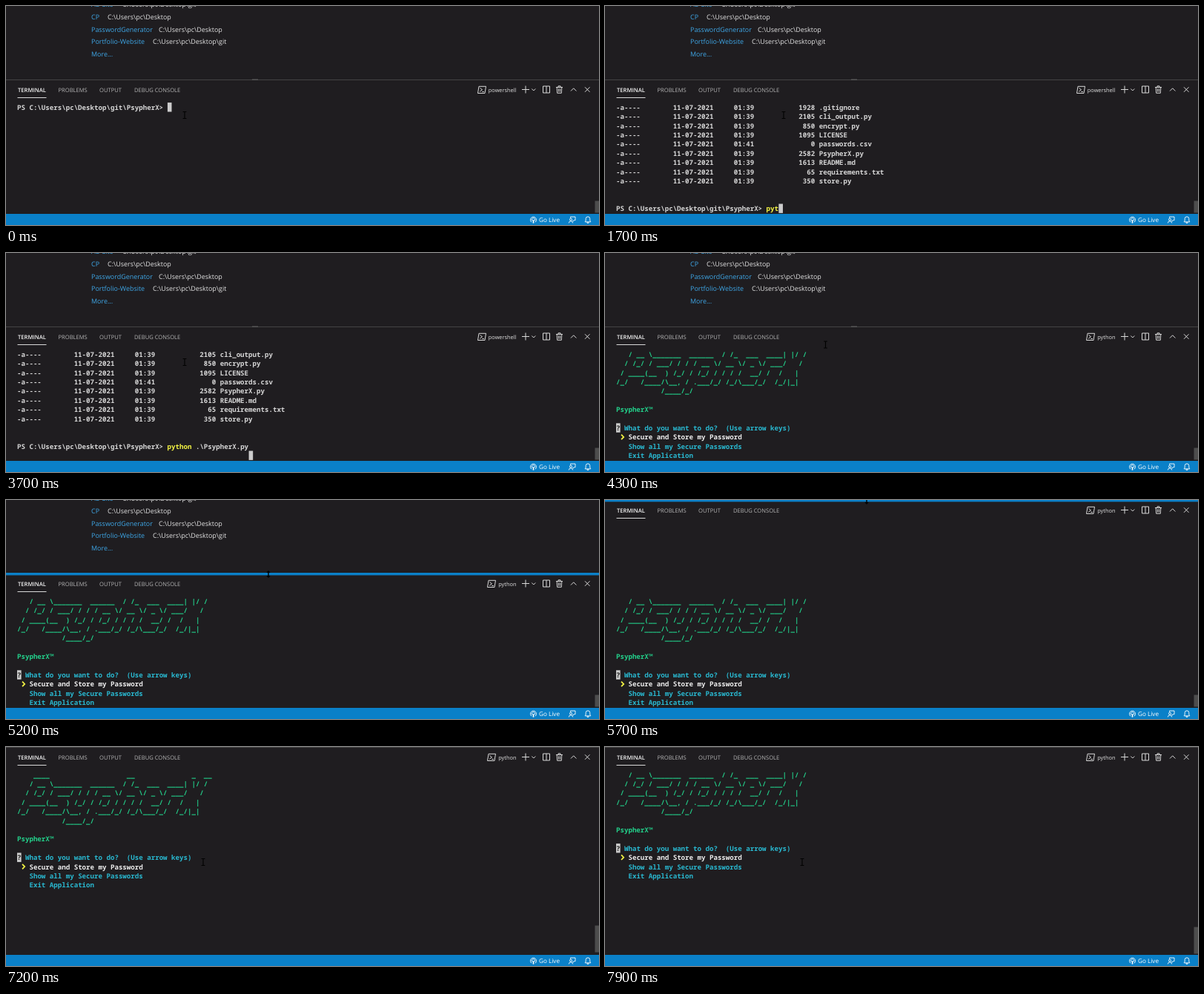
Write an HTML page that moves like this. It is 800 px wide and 295 px high and loops after 8000 ms.

```html
<!DOCTYPE html>
<html lang="en">
<head>
<meta charset="utf-8">
<title>Terminal session</title>
<style>
  html, body { margin: 0; width: 800px; height: 295px; overflow: hidden; background: #1f1d20; }
  svg { display: block; text-rendering: geometricPrecision; }
  text { white-space: pre; }
  .ui { font-family: "Open Sans", "Noto Sans", sans-serif; }
  .link { fill: #3ea6e6; }
  .recent { font-size: 8.95px; fill: #e2e2e2; }
  .tabs { font-size: 7.6px; fill: #b4b4b4; }
  .mono { font: 600 9.14px "Noto Sans Mono", "DejaVu Sans Mono", monospace; fill: #d6d6d6; }
  .cmd { fill: #f5f543; }
  .green { fill: #23d18b; font-weight: 700; }
  .cyan { fill: #29b8d0; }
  .white { fill: #eee; }
  .icon { fill: none; stroke: #d8d8d8; stroke-width: 1; }
  .status .icon { stroke: #fff; stroke-width: .9; }
</style>
</head>
<body>
<svg width="800" height="295" viewBox="0 0 800 295">
  <rect width="800" height="295" fill="#1f1d20"/>
  <g id="recent" class="ui recent"></g>

  <g id="panel">
    <rect y="99.5" width="800" height="300" fill="#1f1d20"/>
    <rect y="99" width="800" height="1" fill="#444"/>
    <rect id="handle" x="332" y="98.6" width="8" height="1" fill="#666"/>
    <rect id="sash" y="98" width="800" height="3.4" fill="#0b80c8"/>
    <g class="ui tabs">
      <text x="16" y="115.8" fill="#f4f4f4" font-weight="600">TERMINAL</text>
      <text x="70.5" y="115.8">PROBLEMS</text>
      <text x="126" y="115.8">OUTPUT</text>
      <text x="173" y="115.8">DEBUG CONSOLE</text>
      <text id="shell" y="115.8" x="688.5" text-anchor="end" fill="#e2e2e2" font-size="7.4"></text>
    </g>
    <rect x="15.5" y="123" width="39" height="1" fill="#d8d8d8"/>
    <g class="icon">
      <path id="shellIcon" d="M1.5 108.3H11L9.5 117.5H0ZM3 110.5L6 112.8L2.7 115.3M5.8 115.5H8.4"/>
      <path d="M696 112.5H706M701 107.5V117.5"/>
      <path d="M709.3 111.5L711.8 114L714.3 111.5"/>
      <path d="M724.5 108H733.5V117H724.5ZM729 108V117"/>
      <path d="M742 109.5H751M745 109.3V107.8H748V109.3M743.2 109.5L743.7 117.3H749.3L749.8 109.5M745.5 111.3V115.6M747.5 111.3V115.6"/>
      <path d="M762 114.5L765.7 110.8L769.4 114.5"/>
      <path d="M781 109.3L787.5 115.8M787.5 109.3L781 115.8"/>
    </g>
  </g>

  <rect id="thumb" x="794.5" width="5.5" fill="#4d4d4d"/>
  <g id="term" class="mono"></g>

  <g class="status">
    <rect y="280" width="800" height="15" fill="#0a80c8"/>
    <g class="icon">
      <path d="M709 291.2A4 4 0 1 1 714 291.2M710 289.4A2.2 2.2 0 1 1 713 289.4"/>
      <path d="M711.5 288V292.6" stroke-width="1.6"/>
      <path d="M761.5 285.5V284H768V288.6H766.6L765 290.2V288.6"/>
      <circle cx="762" cy="287.6" r="1.5"/>
      <path d="M759.3 292.4Q759.5 289.8 762 289.8T764.7 292.4"/>
      <path d="M781.2 290.8H788.8L787.8 289V286.6A2.8 2.8 0 0 0 782.2 286.6V289ZM784 291V292.3H786V291"/>
    </g>
    <text class="ui" x="719" y="291.2" font-size="8.2" fill="#fff">Go Live</text>
  </g>

  <g id="ibeam" stroke="#000" stroke-width="1.1" fill="none">
    <path d="M-2.4 -4.5H-.6L0 -4L.6 -4.5H2.4M0 -4V4M-2.4 4.5H-.6L0 4L.6 4.5H2.4"/>
  </g>
  <g id="resize" fill="#000">
    <path d="M0 -5L2.8 -2H.7V2H2.8L0 5L-2.8 2H-.7V-2H-2.8Z"/>
  </g>
</svg>

<script>
const LOOP = 8000, STEP = 100;
const LEFT = 15, CHAR = 5.484, LINE = 12.4, BOTTOM = 276.1;
const $ = id => document.getElementById(id);
const span = (cls, s) => `<tspan class="${cls}">${s}</tspan>`;

const HOME = String.raw`C:\Users\pc\Desktop`;
const PROMPT = "PS " + HOME + String.raw`\git\PsypherX> `;
const SCRIPT = String.raw`.\PsypherX.py`;

const recent = [
  ["AD Lite", 157, HOME + "\\git"],
  ["CP", 137, HOME],
  ["PasswordGenerator", 206, HOME],
  ["Portfolio-Website", 198, HOME + "\\git"],
  ["More...", 0, ""]
];
$("recent").innerHTML = recent.map(([name, x, path], i) => {
  const y = 1 + i * 16.8;
  return `<text class="link" x="115" y="${y}">${name}</text><text x="${x}" y="${y}">${path}</text>`;
}).join("");

const files = [
  [1928, ".gitignore"], [2105, "cli_output.py"], [850, "encrypt.py"],
  [1095, "LICENSE"], [0, "passwords.csv"], [2582, "PsypherX.py"],
  [1613, "README.md"], [65, "requirements.txt"], [350, "store.py"]
].map(([size, name]) =>
  `-a----        11-07-2021     01:${size ? 39 : 41}${String(size).padStart(15)} ${name}`);

const logo = String.raw`
    ____                   __              _  __
   / __ \_______  ______  / /_  ___  ____| |/ /
  / /_/ / ___/ / / / __ \/ __ \/ _ \/ ___/   /
 / ____(__  ) /_/ / /_/ / / / /  __/ /  /   |
/_/   /____/\__, / .___/_/ /_/\___/_/  /_/|_|
           /____/_/`.split("\n").slice(1);

const menu = [
  ...logo.map(s => span("green", s)), "",
  span("green", "PsypherX™"), "",
  "  " + span("cyan", "What do you want to do?  (Use arrow keys)"),
  "   " + span("white", "Secure and Store my Password"),
  "   " + span("cyan", "Show all my Secure Passwords"),
  "   " + span("cyan", "Exit Application")
];
const ASK = 9;

// [time, command, argument]
const typing = [
  [0, "", ""], [100, "l", ""], [200, "ls", ""], [300, "", ""],
  [1400, "p", ""], [1600, "py", ""], [1700, "pyt", ""], [1800, "pyth", ""],
  [1900, "pytho", ""], [2000, "python", ""], [2200, "python ", ""],
  [2600, "python ", "."], [3100, "python ", SCRIPT]
];
const LISTED = 300, ENTER = 3700, STARTED = 4200;
const SASH_ON = 4900, SASH_OFF = 6100, REFLOW = 6000, SCROLL = 7600;

// [time, x, y]
const path = [
  [0, 241, 147], [3900, 241, 147], [4700, 354, 100], [5300, 354, 100],
  [5650, 353, 1], [5900, 353, 1], [6400, 327, 72], [7200, 266, 155], [LOOP, 266, 155]
];
const last = (table, t) => table.filter(row => row[0] <= t).pop();

function mouseAt(t) {
  const i = path.findIndex(p => p[0] > t);
  const [t0, x0, y0] = path[i - 1], [t1, x1, y1] = path[i];
  const p = (t - t0) / (t1 - t0), e = p * p * (3 - 2 * p);
  return [x0 + (x1 - x0) * e, y0 + (y1 - y0) * e];
}

// Rows count from the top of the visible terminal.
function screen(t) {
  if (t >= STARTED) {
    const tall = t >= REFLOW, top = tall && t < SCROLL ? 0 : 1;
    return { rows: tall ? 20 : 12, lines: menu.slice(top), row: ASK - top, col: 0, ask: true };
  }
  const [, cmd, arg] = last(typing, t);
  const input = PROMPT + span("cmd", cmd) + arg;
  const col = PROMPT.length + cmd.length + arg.length;
  if (t < LISTED) return { rows: 12, lines: [input], row: 0, col };
  const lines = [...files, "", "", input];
  return { rows: 12, lines: t < ENTER ? lines : lines.slice(1), row: 11, col };
}

function drawTerm(t) {
  const { rows, lines, row, col, ask } = screen(t);
  const base = i => BOTTOM - (rows - 1 - i) * LINE;
  let out = lines.map((s, i) => `<text x="${LEFT}" y="${base(i)}">${s}</text>`).join("");
  out += `<rect x="${LEFT + col * CHAR}" y="${base(row) - 9.6}" width="5.6" height="12.4" fill="#ccc"/>`;
  if (ask) {
    const y = base(row + 1) - 3.4;
    out += `<text x="${LEFT}" y="${base(row)}" style="fill:#1e1e1e">?</text>` +
      `<path d="M22 ${y - 3.3}L25.2 ${y}L22 ${y + 3.3}" fill="none" stroke="#f5f543" stroke-width="1.7"/>`;
  }
  $("term").innerHTML = out;
}

const place = (id, x, y) => $(id).setAttribute("transform", `translate(${x} ${y})`);
const show = (id, on) => $(id).setAttribute("visibility", on ? "visible" : "hidden");

function draw(t) {
  const [x, y] = mouseAt(t);
  const atSash = t >= 4700 && t < 5950;
  const lift = t < 5300 ? 0 : t < 5650 ? y - 100 : -99;
  const python = t >= STARTED;

  place("panel", 0, lift);
  show("sash", t >= SASH_ON && t < SASH_OFF);
  show("handle", t < SASH_ON);
  $("shell").textContent = python ? "python" : "powershell";
  place("shellIcon", python ? 649.5 : 636.5, 0);

  const tall = t >= REFLOW;
  const thumbY = !tall ? 262.5 : t < SCROLL ? 240.5 : 242.5;
  $("thumb").setAttribute("y", thumbY);
  $("thumb").setAttribute("height", tall ? 36 : 16);

  drawTerm(t);
  show("ibeam", !atSash);
  show("resize", atSash);
  place("ibeam", x, y);
  place("resize", x, y);
}

const start = performance.now();
let shown = -1;
function tick() {
  const t = Math.floor((performance.now() - start) % LOOP / STEP) * STEP;
  if (t !== shown) draw(shown = t);
  requestAnimationFrame(tick);
}
tick();
</script>
</body>
</html>
```
